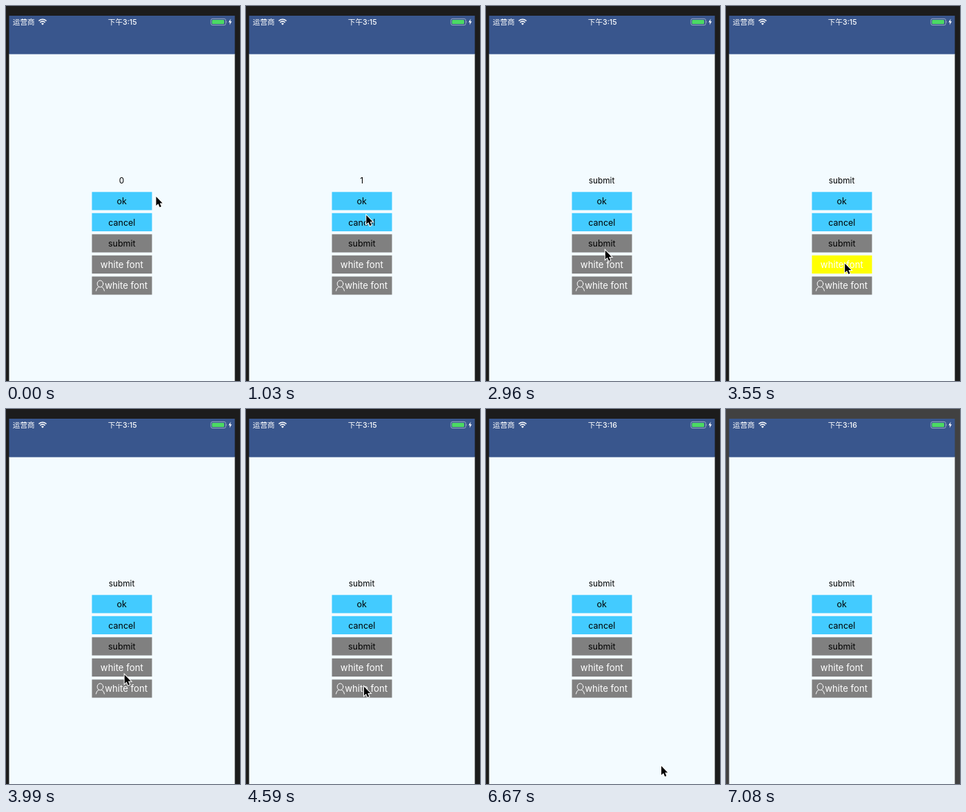
Animation, 339 px wide and 541 px high, one loop 7.18 s. Source, as an HTML page:

```html
<!DOCTYPE html>
<html lang="zh-CN">
<head>
<meta charset="utf-8">
<title>Buttons</title>
<style>
  html, body { margin: 0; width: 100%; height: 100%; overflow: hidden; background: #1c1c1c; }
  svg { display: block; width: 339px; height: 541px; }
  text { font-family: Inter, Roboto, "Noto Sans CJK SC", "Noto Sans CJK", sans-serif; }
</style>
</head>
<body>
<svg viewBox="0 0 339 541">
  <rect id="frame" width="339" height="541"/>
  <rect x="4.5" y="69" width="327" height="472" fill="#f3fbff"/>
  <rect x="4.5" y="14" width="327" height="55.5" fill="#39568d"/>

  <g fill="#fff">
    <text x="9.8" y="26.9" font-size="10.6">运营商</text>
    <text id="clock" x="147.8" y="26.9" font-size="10.6" font-weight="500"></text>
    <path d="M53 27.4 L51 25.2 Q53 23.6 55 25.2Z"/>
    <path d="M49.4 23.6 Q53 20.7 56.6 23.6 M47.4 21.5 Q53 17 58.6 21.5" fill="none" stroke="#fff" stroke-width="1.6"/>
    <rect x="296.9" y="18.4" width="21.4" height="9.2" rx="2.2" fill="none" stroke="#a4b1cb" stroke-width=".9"/>
    <rect x="298.4" y="19.9" width="17.6" height="6.2" rx="1" fill="#4cd964"/>
    <path d="M319.2 21.5 Q320.6 23 319.2 24.5Z" fill="#a4b1cb"/>
    <path d="M325.6 18.6 L322.4 23.6 H324.5 L323.9 27.2 L327.1 22.2 H325Z"/>
  </g>

  <text id="label" x="167.6" y="256.4" font-size="11.8" text-anchor="middle"></text>
  <g id="buttons"></g>
  <g fill="none" stroke="#fff" stroke-linecap="round">
    <ellipse cx="136.5" cy="400.8" rx="4.3" ry="4.8"/>
    <path d="M134.3 405.2 Q130.6 406.8 130.4 411 M138.7 405.2 Q142.2 406.8 142.6 411"/>
  </g>
  <path id="cursor" d="M0 0 V13 L3 10.2 L5.2 15.2 L7.4 14.2 L5.3 9.4 H9.2Z" stroke="#fff" stroke-width="2" paint-order="stroke"/>
</svg>
<script>
const LOOP = 7180, STEP = 148;
const BLUE = '#43cbff', GRAY = '#808080', YELLOW = '#ffff00';
const $ = id => document.getElementById(id);

function add(tag, attrs, content = '') {
  const el = document.createElementNS('http://www.w3.org/2000/svg', tag);
  for (const key in attrs) el.setAttribute(key, attrs[key]);
  el.textContent = content;
  return $('buttons').appendChild(el);
}

function makeButton(title, row, { fill = GRAY, light = false, indent = 0 } = {}) {
  const y = 268.3 + row * 30.5;
  const box = add('rect', { x: 124.5, y, width: 87, height: 26.2 });
  const text = add('text', {
    x: 167.8 + indent, y: y + 18.1, 'text-anchor': 'middle',
    'font-size': light ? 13.2 : 12.5, fill: light ? '#fff' : '#000'
  }, title);
  return { title, fill, light, box, text };
}

const ok = makeButton('ok', 0, { fill: BLUE });
const cancel = makeButton('cancel', 1, { fill: BLUE });
const submit = makeButton('submit', 2);
const white = makeButton('white font', 3, { light: true });
const icon = makeButton('white font', 4, { light: true, indent: 6.4 });
const buttons = [ok, cancel, submit, white, icon];

const presses = [
  { time: 440, button: ok }, { time: 1480, button: cancel }, { time: 2510, button: submit },
  { time: 3550, button: white }, { time: 4440, button: icon }, { time: 5190, button: icon }
];

// The pointer rests at each stop until the next move begins.
const home = { x: 217.5, y: 275 };
const moves = [
  { time: 150, steps: 1, x: 175.5, y: 286.5 },
  { time: 880, steps: 3, x: 173.5, y: 312.5 },
  { time: 2070, steps: 2, x: 173, y: 346.5 },
  { time: 2960, steps: 3, x: 172.2, y: 371.5 },
  { time: 3850, steps: 2, x: 171, y: 400.5 },
  { time: 5630, steps: 2, x: 219.5, y: 468.3 },
  { time: 6230, steps: 2, x: 254, y: 515 }
];

const stepsSince = (time, t) => Math.floor((t - time) / STEP);

function pointerAt(t) {
  return moves.filter(move => move.time <= t).reduce((from, to) => {
    const p = Math.min(1, (stepsSince(to.time, t) + 1) / to.steps) ** 1.3;
    return { x: from.x + (to.x - from.x) * p, y: from.y + (to.y - from.y) * p };
  }, home);
}

// A press takes effect one step later: ok counts up, the other dark titles are echoed.
function labelAt(t) {
  return presses
    .filter(({ time, button }) => !button.light && stepsSince(time, t) >= 1)
    .reduce((value, { button }) => button === ok ? value + 1 : button.title, 0);
}

function drawButton(button, t) {
  const press = presses.filter(p => p.button === button && p.time <= t).pop();
  const age = press ? stepsSince(press.time, t) : Infinity;
  button.box.setAttribute('fill', button.light && age < 1 ? YELLOW : button.fill);
  button.text.setAttribute('opacity', button.light ? 1 : Math.min(1, 0.2 + 0.4 * age));
}

function render(t) {
  const ended = t >= 7080;
  $('frame').setAttribute('fill', ended ? '#414141' : '#1c1c1c');
  $('clock').textContent = t < 6670 ? '下午3:15' : '下午3:16';
  $('label').textContent = labelAt(t);
  buttons.forEach(button => drawButton(button, t));

  const { x, y } = pointerAt(t);
  $('cursor').setAttribute('transform', `translate(${x} ${y})`);
  $('cursor').setAttribute('visibility', ended ? 'hidden' : 'visible');
}

const start = performance.now();
function tick() {
  render((performance.now() - start) % LOOP);
  requestAnimationFrame(tick);
}
tick();
</script>
</body>
</html>
```
